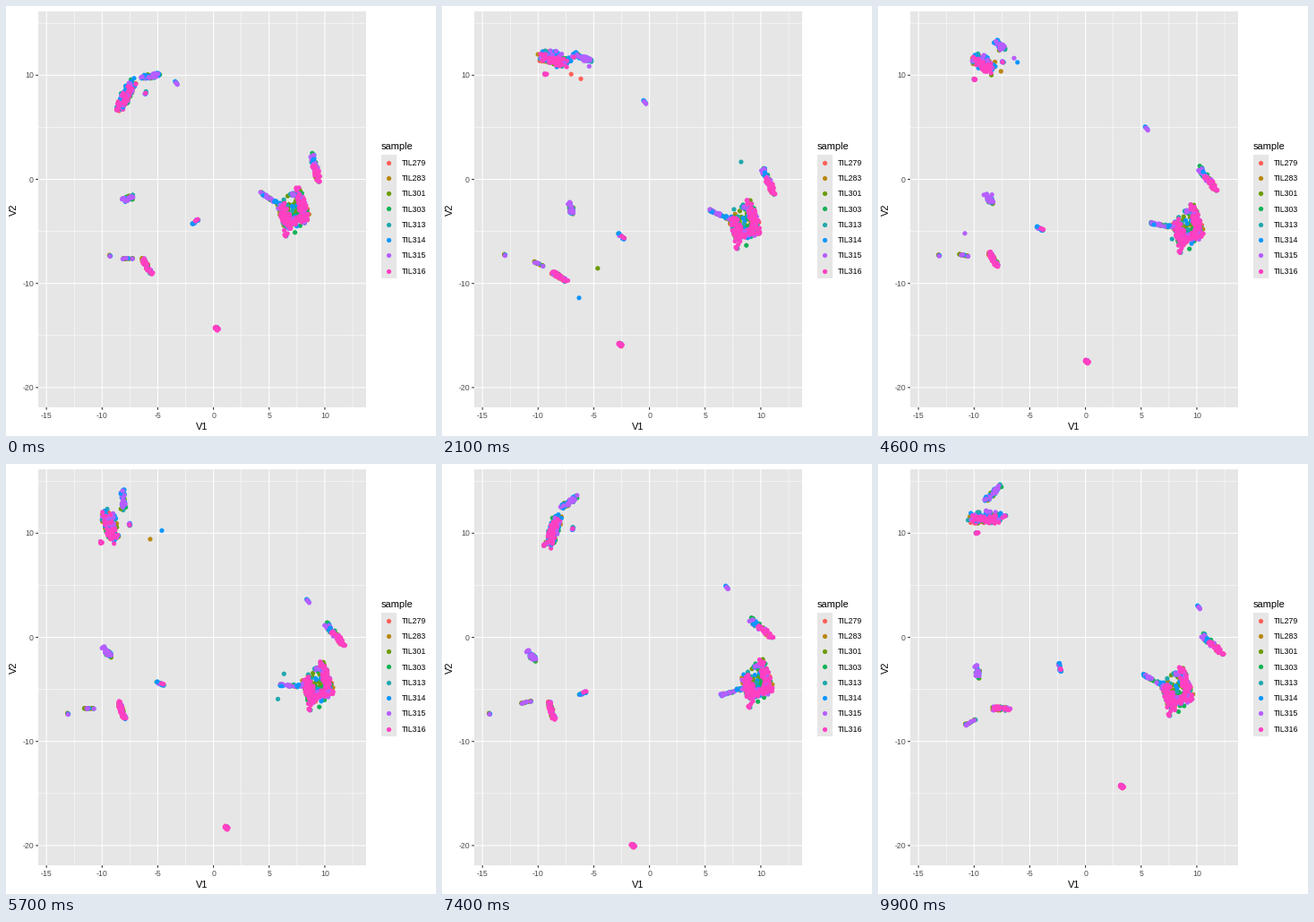
Write a matplotlib script that moves like this. It is 480 by 480 pixels and loops after 10000 ms.

```python
import numpy as np
import matplotlib.pyplot as plt
from matplotlib.animation import FuncAnimation
from matplotlib.patches import Rectangle

plt.rcParams["font.family"] = "Liberation Sans"

SIZE, FRAMES, STEP = 480, 100, 100
KEYS = np.array([0, 21, 34, 57, 74, 85, 99])  # frames at which poses are set
STRAYS = {1: 16, 2: 14, 3: 8, 5: 16}          # wandering points per pose
SAMPLES = [f"TIL{n}" for n in (279, 283, 301, 303, 313, 314, 315, 316)]
COLORS = np.array(["#FF6058", "#B9870F", "#6B9C00", "#14B256",
                   "#1FA9AC", "#0C96FF", "#B65EFF", "#FF40C2"])
LEFT, RIGHT, TOP, BOTTOM = 36, 402, 6, 448
GREY, DARK = "#E6E6E6", "#4D4D4D"
DOT = 5.2

rng = np.random.default_rng(11)
tracks, hues = [], []


def path(*poses):
    """Poses of an island: x, y and, if given, angle and girth."""
    full = np.tile([0.0, 0, 45, 1], (len(KEYS), 1))
    full[:, :len(poses[0])] = poses
    return full


def part(poses, n, weights, length, width, dx=0, dy=0, lead=0, tilt=None):
    """Scatter n points in a ribbon carried by an island.

    The ribbon lies along the island's angle, or along a fixed tilt;
    lead moves it forward along that direction.
    """
    w = np.array([int(c) for c in weights])
    hues.append(rng.choice(len(w), n, p=w / w.sum()))
    u = rng.uniform(-0.5, 0.5, n)
    r, phi = np.sqrt(rng.random(n)), rng.uniform(0, 2 * np.pi, n)
    disc = width * r * np.array([np.cos(phi), np.sin(phi)])
    track = []
    for x, y, angle, girth in poses:
        a = np.radians(angle if tilt is None else tilt)
        along = lead + length * np.clip(u + rng.normal(0, 0.07, n), -0.5, 0.5)
        track.append(np.column_stack([
            x + dx + along * np.cos(a) + girth * disc[0],
            y + dy + along * np.sin(a) + girth * disc[1]]))
    tracks.append(np.array(track))


crown = path((134, 99, -62, 1), (125, 59, 15, 1), (119, 59, -12, 0.6),
             (116, 70, 70, 1.1), (124, 74, -72, 1), (118, 70, -55, 0.35),
             (120, 60, 0, 1))
part(crown, 110, "22222228", 30, 5.5, dy=1)
part(crown, 50, "12223840", 30, 6, dx=2, dy=-3)
part(crown, 7, "00011014", 3, 1, dx=-10, dy=17)
part(crown, 7, "00001412", 4, 0.8, dx=22, dy=-2)

crest = path((163, 78, -5), (158, 58, 25), (144, 48, -10), (131, 41, 85),
             (143, 42, -30), (136, 39, -35), (129, 32, -40))
part(crest, 50, "01212860", 22, 2.8)

spark = path((190, 86), (226, 107), (259, 119), (337, 153), (318, 138),
             (335, 148), (358, 160))
part(spark, 6, "00000340", 5, 0.6)

arc = path((345, 180, 75), (364, 195, 65), (369, 196, 55), (367, 190, 50),
           (356, 183, 40), (363, 190, 42), (373, 201, 43))
part(arc, 24, "01111440", 15, 3, lead=-9)
part(arc, 26, "22110018", 15, 3, lead=6)
part(arc, 8, "11001014", 3, 1, lead=16)

main = path((320, 231, 32), (337, 245, 24), (343, 250, 17), (347, 249, 3),
            (351, 246, -17), (343, 250, 2), (333, 255, 28))
part(main, 40, "01112550", 26, 1.5, lead=-29)
part(main, 50, "12461210", 30, 10, dx=2, tilt=70)
part(main, 100, "11111119", 26, 6, dx=-8, dy=5, tilt=75)
part(main, 95, "11111129", 31, 5, dx=10, dy=-10, tilt=70)
part(main, 60, "11121119", 26, 4.5, dx=2, dy=9, tilt=-10)
part(main, 14, "00111450", 6, 2, dy=-21)
part(main, 5, "10001005", 1, 1, dx=-8, dy=25)

isle = path((136, 215, -20), (144, 226, 80), (136, 221, 50), (113, 210, 50),
            (100, 214, 50), (105, 221, 60), (111, 232, 85))
part(isle, 38, "00112461", 10, 2.8)

chip = path((211, 241, -40), (200, 257, 40), (190, 252, 30), (172, 245, 20),
            (157, 256, -25), (178, 243, -55), (203, 227, 75))
part(chip, 16, "10011522", 8, 1)

slug = path((157, 290, 58), (131, 302, 30), (128, 291, 45), (129, 275, 70),
            (122, 275, 72), (129, 275, 42), (137, 273, 0))
part(slug, 70, "22222228", 18, 2.2)

dash = path((136, 282, 0), (108, 288, 25), (99, 284, 25), (93, 273, 0),
            (94, 266, -12), (99, 275, -20), (104, 288, -28))
part(dash, 15, "02302230", 11, 0.6)

mote = path((116, 279), (70, 278), (67, 278), (69, 279), (53, 279),
            (73, 284), (98, 291))
part(mote, 6, "02000130", 2, 0.4)

base = path((235, 360), (199, 378), (219, 387), (246, 406), (213, 426),
            (239, 397), (272, 360))
part(base, 25, "11011119", 3, 1.7)

# later samples lie mostly, but not strictly, on top
hue = np.concatenate(hues)
order = np.argsort(hue + rng.normal(0, 0.8, len(hue)))
hue = hue[order]
track = np.concatenate(tracks, axis=1)[:, order]

# a few points drift off towards other islands
for k, count in STRAYS.items():
    movers = rng.choice(np.flatnonzero(hue < 7), count, replace=False)
    goals = rng.choice(len(hue), count)
    gap = track[k, goals] - track[k, movers]
    dist = np.hypot(*gap.T) + 1
    share = np.minimum(1, rng.exponential(22, count) / dist)
    track[k, movers] += share[:, None] * gap


def px(v):
    return 231.6 + 12.43 * v


def py(v):
    return 193.5 - 11.62 * v


fig = plt.figure(figsize=(SIZE / 72, SIZE / 72), dpi=72, facecolor="white")
ax = fig.add_axes([0, 0, 1, 1])
ax.set_xlim(0, SIZE)
ax.set_ylim(SIZE, 0)
ax.axis("off")


def box(x, y, w, h):
    ax.add_patch(Rectangle((x, y), w, h, fc=GREY, lw=0, zorder=0))


def line(xs, ys, lw=1.07, color="white"):
    ax.plot(xs, ys, color=color, lw=lw, solid_capstyle="butt",
            snap=False, zorder=1)


def label(x, y, text, size=8.8, **kw):
    ax.text(x, y, text, fontsize=size, **kw)


box(LEFT, TOP, RIGHT - LEFT, BOTTOM - TOP)
for v in np.arange(-12.5, 13, 5):
    line([px(v)] * 2, [TOP, BOTTOM], 0.53)
for v in range(-15, 16, 10):
    line([LEFT, RIGHT], [py(v)] * 2, 0.53)
for v in range(-15, 11, 5):
    line([px(v)] * 2, [TOP, BOTTOM])
    line([px(v)] * 2, [BOTTOM, BOTTOM + 2.75], color="#333333")
    label(px(v), 460, str(v), color=DARK, ha="center")
for v in range(-20, 11, 10):
    line([LEFT, RIGHT], [py(v)] * 2)
    line([LEFT - 2.75, LEFT], [py(v)] * 2, color="#333333")
    label(31, py(v) + 3.2, str(v), color=DARK, ha="right")
label((LEFT + RIGHT) / 2, 473, "V1", 11, ha="center")
label(8.8, (TOP + BOTTOM) / 2, "V2", 11, rotation=90,
      ha="center", va="center")

KEY_X, KEY_Y, KEY = 418.7, 165.9, 17.28
label(KEY_X, 160, "sample", 11)
box(KEY_X, KEY_Y, KEY, len(SAMPLES) * KEY)
for i, name in enumerate(SAMPLES):
    y = KEY_Y + KEY * (i + 0.5)
    ax.scatter(KEY_X + KEY / 2, y, s=DOT ** 2, c=COLORS[i], lw=0, zorder=2)
    label(441.4, y + 3.2, name)

dots = ax.scatter(*track[0].T, s=DOT ** 2, c=COLORS[hue], lw=0, zorder=3)


def update(f):
    k = min(np.searchsorted(KEYS, f, side="right") - 1, len(KEYS) - 2)
    t = (f - KEYS[k]) / (KEYS[k + 1] - KEYS[k])
    dots.set_offsets((1 - t) * track[k] + t * track[k + 1])
    return (dots,)


anim = FuncAnimation(fig, update, frames=FRAMES, interval=STEP,
                     repeat=True, repeat_delay=0)
plt.show()
```
